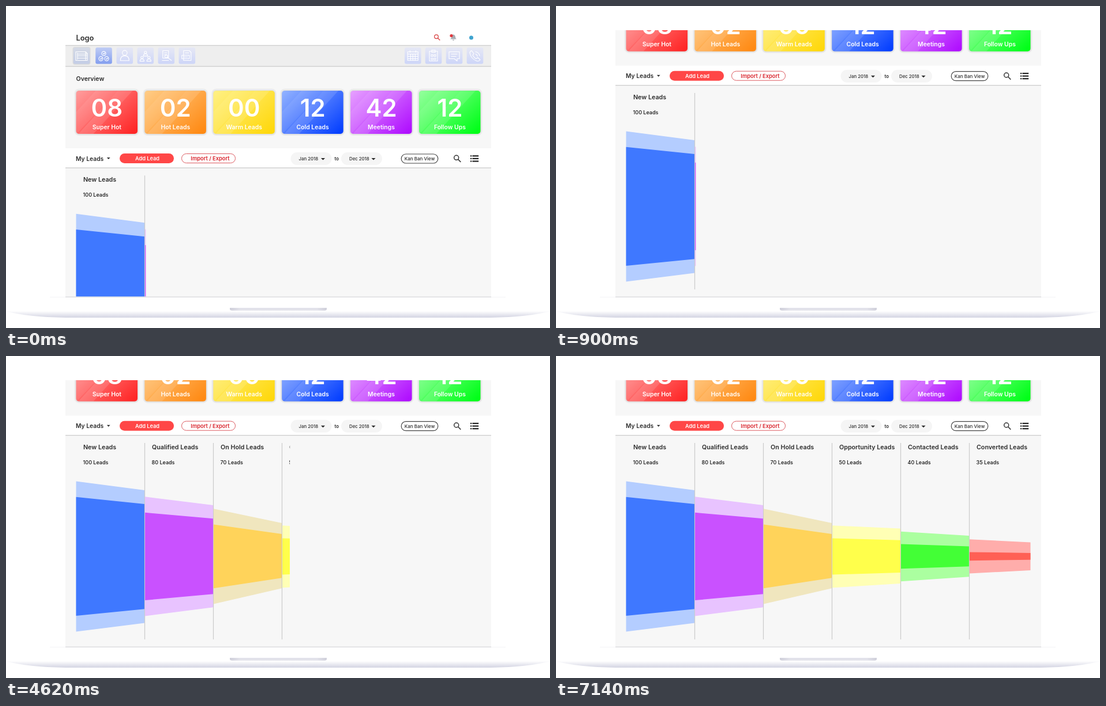
Animation of 943 by 559 pixels, one loop 7.2 s. Source, as an HTML page:

```html
<!DOCTYPE html>
<html lang="en">
<head>
<meta charset="utf-8">
<title>Lead funnel</title>
<style>
html, body { margin: 0; width: 100%; height: 100%; overflow: hidden; background: #fff; }
svg { display: block; width: 100%; height: 100%; }
text { font-family: Inter, sans-serif; font-weight: 600; fill: #2b2b2b; }
.mid { text-anchor: middle; }
.line { fill: none; stroke: #fff; stroke-width: 1.1; stroke-linejoin: round; stroke-linecap: round; }
</style>
</head>
<body>
<svg viewBox="0 0 943 559">
  <defs>
    <clipPath id="screen"><rect x="103" y="42" width="738" height="462.3"/></clipPath>
    <clipPath id="reveal"><rect id="revealBox" x="103" y="0" width="139" height="700"/></clipPath>
    <linearGradient id="base" x1="0" y1="0" x2="0" y2="1">
      <stop offset="0" stop-color="#fdfdfe"/><stop offset="1" stop-color="#d3d4e2"/>
    </linearGradient>
    <linearGradient id="notch" x1="0" y1="0" x2="1" y2="0">
      <stop offset="0" stop-color="#cfcfda"/><stop offset=".1" stop-color="#e2e2ea"/>
      <stop offset=".9" stop-color="#e2e2ea"/><stop offset="1" stop-color="#cfcfda"/>
    </linearGradient>
    <linearGradient id="tool" x1="0" y1="0" x2="0" y2="1">
      <stop offset="0" stop-color="#e6e8f5"/><stop offset="1" stop-color="#cdd5f8"/>
    </linearGradient>
    <linearGradient id="toolGrey" x1="0" y1="0" x2="0" y2="1">
      <stop offset="0" stop-color="#d5dae6"/><stop offset="1" stop-color="#c3cde6"/>
    </linearGradient>
    <linearGradient id="toolActive" x1="0" y1="0" x2="0" y2="1">
      <stop offset="0" stop-color="#c0cdf5"/><stop offset="1" stop-color="#839eef"/>
    </linearGradient>
  </defs>
  <path d="M0 530H943Q905 540 840 541H103Q38 540 0 530Z" fill="url(#base)"/>
  <path d="M388 524H556V526Q556 528.7 552 528.7H392Q388 528.7 388 526Z" fill="url(#notch)"/>
  <rect x="103" y="42" width="738" height="463" fill="#f7f7f7"/>
  <path d="M76 505.4H866" stroke="#f3f3f5"/>
  <path d="M103 505.2H841" stroke="#d9d9dc" stroke-width="1.2"/>
  <g clip-path="url(#screen)"><g id="page"></g></g>
</svg>
<script>
const LOOP = 7200, SCROLL = 143.3, PITCH = 118.9;
const page = document.getElementById('page');
const revealBox = document.getElementById('revealBox');

const rect = (x, y, w, h, fill, r = 0, extra = '') =>
  `<rect x="${x}" y="${y}" width="${w}" height="${h}" rx="${r}" fill="${fill}" ${extra}/>`;
const path = (d, fill, extra = '') => `<path d="${d}" fill="${fill}" ${extra}/>`;
const text = (x, y, size, str, extra = '') =>
  `<text x="${x}" y="${y}" font-size="${size}" ${extra}>${str}</text>`;
const rule = y => rect(103, y - .7, 738, 1.4, '#cfcfcf');
const caret = (x, y, w) => path(`M${x - w} ${y - w / 2}h${2 * w}l${-w} ${w}z`, '#2b2b2b');
const magnifier = (x, y, r, color, width) =>
  `<g fill="none" stroke="${color}" stroke-width="${width}"><circle cx="${x}" cy="${y}" r="${r}"/>` +
  `<path d="M${x + r * .7} ${y + r * .7}l${r * 1.2} ${r * 1.2}"/></g>`;

const person = (x, y, s) =>
  `M${x - s} ${y - s}a${s} ${s} 0 1 0 ${2 * s} 0a${s} ${s} 0 1 0 ${-2 * s} 0` +
  `M${x - 1.8 * s} ${y + 2.2 * s}q0 ${-2 * s} ${1.8 * s} ${-2 * s}t${1.8 * s} ${2 * s}z`;
const ring = (x, y, r) => `M${x - r} ${y}a${r} ${r} 0 1 0 ${2 * r} 0a${r} ${r} 0 1 0 ${-2 * r} 0`;

// Icon strokes, relative to the centre of each tool button
const tools = [
  [131, 'M-10-7H7V8H-10zM-7-3H10M-7 0H10M-7 4H10M-7-5V6M7-7L10-4V8H7'],
  [169.5, ring(0, -4, 3.6) + ring(-5, 5, 3.6) + ring(5, 5, 3.6) + 'M-1-4L0-3L2-5M-6 5L-5 6L-3 4M4 5L5 6L7 4'],
  [205.8, person(0, -1, 4.2)],
  [241.8, person(0, -4, 2) + person(-6, 5, 2) + person(6, 5, 2)],
  [277.8, 'M-6-9H4V4H-6zM-3-5H1M-3-2H1M1 2L9 8M-7 8H4' + ring(0, 1, 2.5)],
  [313.8, 'M-6-9H4L7-6V8H-6zM-9-1H4V5H-9zM-3-5H3M-6 2H1'],
  [705.3, 'M-9-7H9V8H-9zM-9-3H9M-9 1H9M-9 5H9M-4-3V8M0-3V8M4-3V8M-5-9V-6M5-9V-6'],
  [741, 'M-7-8H7V9H-7zM-3-10H3V-6H-3zM-4-2H-1V1H-4zM1-2H4V1H1zM-4 4H-1V7H-4zM1 4H4V7H1z'],
  [777, 'M-9-7H9V5H5V9L0 5H-9zM-5-3H5M-5 1H3'],
  [813, 'M-6-9L-2-4L-4-1Q-1 4 2 5L5 3L9 7Q7 10 3 9Q-7 5-9-5Q-9-8-6-9M1-7Q7-6 8 0M1-3Q4-2 4 1'],
];

const cards = [
  ['08', 'Super Hot', '#ff9c9c', '#ff2727'],
  ['02', 'Hot Leads', '#ffcc86', '#ff8a14'],
  ['00', 'Warm Leads', '#fff083', '#ffd80c'],
  ['12', 'Cold Leads', '#92b2ff', '#0640ff'],
  ['42', 'Meetings', '#e6a0ff', '#b010ff'],
  ['12', 'Follow Ups', '#93ff9c', '#00ff18'],
];

// x range, then left/right edges: outer top, outer bottom, inner top, inner bottom
const stages = [
  ['New Leads', 100, '#b4cdff', '#3f78ff', 121.5, 240.2, 217.5, 233, 478.5, 463.5, 244.7, 257, 451, 439.3],
  ['Qualified Leads', 80, '#e8c3ff', '#c951ff', 241, 359.2, 244.3, 259, 451.5, 436.3, 271.8, 282.3, 424, 413.2],
  ['On Hold Leads', 70, '#f0e6be', '#ffd35a', 360, 478.2, 265.3, 290, 430.5, 403.3, 292.5, 309, 403.2, 385.3],
  ['Opportunity Leads', 50, '#ffffb5', '#ffff4b', 479, 597, 294.3, 299.6, 402.3, 395, 316.5, 319.7, 379.5, 376],
  ['Contacted Leads', 40, '#abffa0', '#43ff36', 598, 716, 304.8, 312, 391.2, 383.2, 326.6, 330.5, 369.3, 365.3],
  ['Converted Leads', 35, '#ffadab', '#ff6055', 717, 822.5, 318.3, 323.5, 377.5, 372, 340.4, 342, 355.2, 353.8],
];

function header() {
  const icons = tools.map(([x, d], i) => {
    const fill = ['url(#toolGrey)', 'url(#toolActive)'][i] || 'url(#tool)';
    const halo = i ? '' : rect(x - 15.5, 71, 31, 31, '#dcdcdc', 4);
    return halo + rect(x - 14.3, 72, 28.6, 28.5, fill, 3) +
      `<path class="line" transform="translate(${x} 86.5)" d="${d}"/>`;
  }).join('');
  return rect(103, 0, 738, 68, '#fff') + text(121.5, 59.8, 12.8, 'Logo') +
    magnifier(746, 53.2, 3.3, '#d94343', 1.3) +
    path('M770 57.5q2-1 2-4q0-4 3-4t4 4q0 3 2 4zM773.5 58.5h4q-2 3-4 0z', '#a9adb3') +
    '<circle cx="772" cy="51.5" r="2.6" fill="#e0383e"/><circle cx="806.5" cy="55" r="3.5" fill="#3fa3cf"/>' +
    rect(103, 68, 738, 37, '#eee') + rule(68.5) + rule(104.8) + icons;
}

function overview() {
  return text(121.5, 130.3, 10.6, 'Overview') + cards.map(([count, label, light, dark], i) => {
    const x = 121.5 + i * PITCH, mid = x + 53.4;
    return `<linearGradient id="card${i}" gradientUnits="userSpaceOnUse" x1="${x + 10}" y1="140" x2="${x + 90}" y2="228">
      <stop offset="0" stop-color="${light}"/><stop offset="1" stop-color="${dark}"/></linearGradient>` +
      rect(x - 3, 143.5, 112.5, 81.5, '#ececec', 8) + rect(x - 1.2, 146, 109, 77.5, '#e0e0e0', 6) +
      rect(x, 147, 106.5, 75, `url(#card${i})`, 5) +
      path(`M${x + 34} 147H${x + 72}L${x + 2} 221L${x} 218V184Z`, '#fff', 'opacity=".08"') +
      path(`M${x + 72} 147H${x + 98}L${x + 30} 222H${x + 4}Z`, '#fff', 'opacity=".12"') +
      text(mid, 192, 42, count, 'class="mid" style="fill:#fff"') +
      text(mid, 213.7, 10.4, label, 'class="mid" style="fill:#fff"');
  }).join('');
}

function toolbar() {
  const date = (x, label) => rect(x, 254, 71, 22, '#f5f5f5', 11) +
    text(x + 14, 268.2, 7.8, label, 'style="font-weight:500"') + caret(x + 56, 265.8, 3.6);
  const list = [260.3, 264.9, 269.5].map(y =>
    rect(805, y - 1.1, 2.2, 2.2, '#222') + rect(808.4, y - 1.1, 10.8, 2.2, '#222')).join('');
  return rect(103, 247, 738, 34, '#fff') + rule(281) +
    text(121, 268.6, 10.3, 'My Leads') + caret(177.7, 264.5, 2.9) +
    rect(197, 256, 94, 17, '#ff4747', 8.5) +
    text(245, 268.2, 9.2, 'Add Lead', 'class="mid" style="fill:#fff"') +
    rect(304.5, 256.5, 93, 16, '#fff', 8, 'stroke="#dc5a60"') +
    text(354, 268.2, 9.3, 'Import / Export', 'class="mid" style="fill:#d9222b"') +
    date(493.5, 'Jan 2018') + date(581, 'Dec 2018') + text(569.5, 268, 7.8, 'to') +
    rect(685.2, 257, 63.6, 16, '#fff', 8, 'stroke="#444" stroke-width="1.2"') +
    text(717, 268, 8, 'Kan Ban View', 'class="mid" style="font-weight:500"') +
    magnifier(780.7, 263.3, 4, '#333', 1.5) + list;
}

function funnel() {
  const band = (x0, x1, t0, t1, b0, b1, fill) => path(`M${x0} ${t0}L${x1} ${t1}V${b1}L${x0} ${b0}Z`, fill);
  const columns = stages.map(([name, count, light, dark, x0, x1, ...y], i) =>
    (i ? rect(x0 - 1.1, 151, 1.2, 341, '#cbcbcb') : '') +
    band(x0, x1, ...y.slice(0, 4), light) + band(x0, x1, ...y.slice(4), dark) +
    text(134 + 119 * i, 162.2, 10.7, name) +
    text(133.6 + 119 * i, 187.8, 9, `${count} Leads`, 'style="font-weight:500;fill:#111"')).join('');
  return `<g transform="translate(0 ${SCROLL})" clip-path="url(#reveal)">${columns}</g>`;
}

page.innerHTML = header() + overview() + toolbar() + funnel();

// Right edge of the visible funnel: [time, x]
const edgeKeys = [[0, 242.3], [1770, 242.3], [2730, 353], [3600, 353], [4350, 455.5], [5670, 634.5], [7140, 823], [LOOP, 823]];

function edgeAt(t) {
  const i = edgeKeys.findIndex(([time]) => time > t);
  const [t0, x0] = edgeKeys[i - 1], [t1, x1] = edgeKeys[i];
  return x0 + (x1 - x0) * (t - t0) / (t1 - t0);
}

function draw(now) {
  const t = now % LOOP;
  const p = Math.min(t / 900, 1);
  const eased = p * p * (3 - 2 * p);
  const sway = -.8 * Math.sin(Math.PI * eased);
  page.setAttribute('transform', `translate(${sway} ${-SCROLL * eased})`);
  revealBox.setAttribute('width', edgeAt(t) - 103);
}

let start;
function tick(now) {
  start ??= now;
  draw(now - start);
  requestAnimationFrame(tick);
}
draw(0);
requestAnimationFrame(tick);
</script>
</body>
</html>
```
